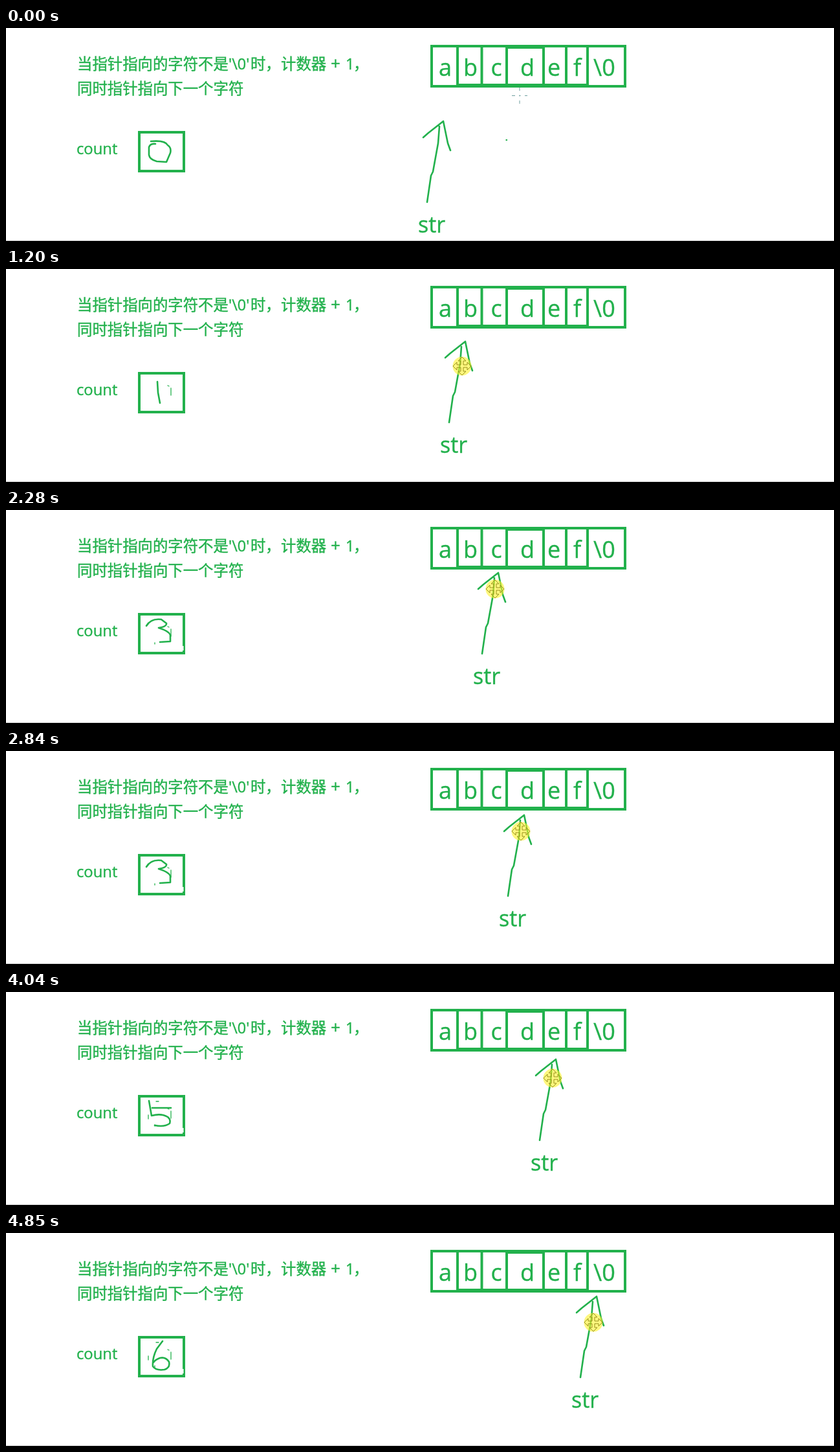
An HTML page for the animation above (4.91 s loop, 1280 by 329 pixels).

```html
<!DOCTYPE html>
<html lang="zh-CN">
<head>
<meta charset="utf-8">
<title>strlen</title>
<style>
html, body { margin: 0; width: 100%; height: 100%; overflow: hidden; background: #fff; }
svg { display: block; font: 23.4px "Open Sans", "Noto Sans CJK SC", "Noto Sans CJK", sans-serif; }
text { fill: #22b14c; stroke: #22b14c; stroke-width: .4; white-space: pre; }
.ink { fill: none; stroke: #22b14c; stroke-width: 2.6; stroke-linecap: round; stroke-linejoin: round; }
.frame { fill: none; stroke: #22b14c; stroke-width: 4; }
#cells { font-size: 36px; text-anchor: middle; }
</style>
</head>
<body>
<svg width="1280" height="329" viewBox="0 0 1280 329">
  <path d="M0 328.5H1280" stroke="#c4c4c4"/>
  <text y="64"><tspan x="110">当指针指向的字符不是</tspan><tspan x="344">'\0'</tspan><tspan x="378">时</tspan><tspan x="401">，</tspan><tspan x="425">计数器</tspan><tspan x="502" font-size="26">+</tspan><tspan x="525">1</tspan><tspan x="537">，</tspan></text>
  <text x="110" y="102">同时指针指向下一个字符</text>
  <text x="109" y="195" font-size="23.8">count</text>
  <path class="frame" d="M206 161H275V221H206ZM658 28H957V90H658ZM698 88H899M774 30H831"/>
  <g id="cells"></g>
  <g id="cross" stroke="#6f9f9f">
    <path d="M794 92V117M782 104.500H806" stroke-dasharray="5 6.500 2 6.500"/>
    <path d="M772.500 173H775" stroke="#22b14c" stroke-width="2"/>
  </g>
  <path id="digit" class="ink"/>
  <path id="specks" class="ink" style="stroke-width:1.3"/>
  <path id="notch" d="M273.500 210V217" stroke="#fff" stroke-width="2"/>
  <g id="arrow">
    <path class="ink" d="M651 269L657 228L660 222L668 178L670 152M645 169L653 162L676 144L683 178L687 189"/>
    <text x="637" y="316" font-size="34">str</text>
  </g>
  <g id="cursor">
    <circle r="14.500" fill="#fff12a" opacity=".6"/>
    <g id="move" fill="none" stroke="#98921c"></g>
  </g>
</svg>
<script>
const $ = id => document.getElementById(id);
const LOOP = 4910, STEP = 67, TIP = 676, REST = -48;

// Cells: text, centre, left edge
const cells = [['a', 679, 658], ['b', 718, 698], ['c', 758, 735.5], ['d', 806, 774],
  ['e', 847, 831], ['f', 883, 866], ['\\0', 925, 899]];

$('cells').innerHTML = cells.map(([s, x, left]) =>
  `<text x="${x}" y="74">${s}</text><path class="frame" d="M${left} 28V90"/>`).join('');
$('move').innerHTML = [0, 90, 180, 270].map(a =>
  `<path transform="rotate(${a})" d="M0-14L6-8H2V-2H8V-6L14 0"/>`).join('');

// Handwritten 0 to 6, and the bits that stay behind when one is rubbed out
const digits = [
  'M224 175Q246 173 250 181Q256 185 254 193L248 207L233 206Q222 203 221 196V184Q223 178 231 179',
  'M234 174L235 191L238 207',
  'M217 179Q221 170 229 170Q236 172 237 182L239 205L230 206Q244 211 266 212M235 174L237 190L239 205',
  'M217 179Q224 167 240 169L248 175Q249 180 236 182Q252 187 254 193V203L238 204',
  'M232 168L220 191H255M240 174V211',
  'M221 168L225 191Q240 187 250 193Q255 197 253 203Q245 209 230 206M226 179H255',
  'M242 167L233 179Q226 193 227 206Q232 213 245 211Q254 208 252 199Q247 191 238 193Q230 196 228 200'
];
const leftovers = ['M255 184V195M250 180L252 181', '', 'M230 205V207', '', 'M220 190V196M232 169H236'];
const countTimes = [0, 870, 1270, 2280, 3240, 4040, 4850];

// Each drag snaps the arrow to `from`, then eases it under the next cell;
// `away` is where the pointer clicks afterwards to drop the selection
const drags = [
  { at: 70, span: 70, from: [3, -18], to: [6, -35], grip: 182 },
  { at: 870, span: 470, from: [6, -35], to: [42, -36], grip: 182, away: [758, 277] },
  { at: 1740, span: 270, from: [58, -34], grip: 172 },
  { at: 2280, span: 760, from: [85, -47], grip: 169 },
  { at: 3240, span: 70, from: [140, -45], grip: 172, away: [859, 286] },
  { at: 4040, span: 480, from: [174, -40], grip: 173 },
  { at: 4850, span: 60, from: [237, -46], grip: 184 }
];
drags.forEach((d, i) => d.to ??= [cells[i][1] - TIP, REST]);

const place = (id, x, y) => $(id).setAttribute('transform', `translate(${x} ${y})`);
const show = (id, on) => $(id).style.display = on ? '' : 'none';

function arrowAt(drag, t) {
  if (!drag) return [0, 0];
  const u = Math.min(1, Math.floor((t - drag.at) / STEP) * STEP / drag.span);
  const ease = Math.sin(u * Math.PI / 2);
  const sag = [0, 4 * Math.sin(u * Math.PI)];
  return drag.from.map((a, i) => Math.round(a + (drag.to[i] - a) * ease + sag[i]));
}

function cursorAt(drag, t, [x, y]) {
  if (!drag) return;
  const since = t - drag.at - drag.span;
  if (since < 0) return [671 + x, drag.grip + y];
  if (since < 140) return drag.away;
}

function draw(t) {
  const drag = drags.findLast(d => d.at <= t);
  const pos = arrowAt(drag, t);
  place('arrow', ...pos);

  const cursor = cursorAt(drag, t, pos);
  show('cursor', cursor);
  if (cursor) place('cursor', ...cursor);
  show('cross', !drag);

  const count = countTimes.findLastIndex(s => s <= t);
  $('digit').setAttribute('d', digits[count]);
  $('specks').setAttribute('d', leftovers.slice(0, count).join(''));
  show('notch', count > 2);
}

const begin = performance.now();
function tick() {
  draw((performance.now() - begin) % LOOP);
  requestAnimationFrame(tick);
}
tick();
</script>
</body>
</html>
```
